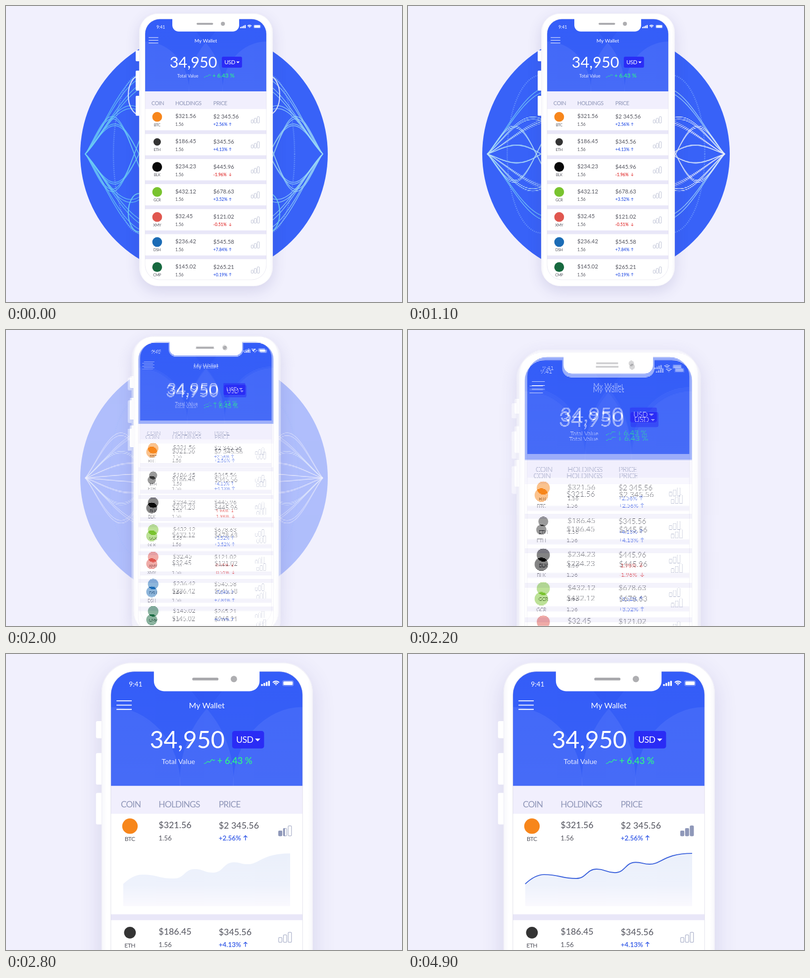
An HTML page with a canvas that plays this animation: 800x600 px, repeating every 5000 ms.

```html
<!DOCTYPE html>
<html lang="en">
<head>
<meta charset="utf-8">
<title>Wallet</title>
<style>
  html, body { margin: 0; width: 100%; height: 100%; overflow: hidden; background: #f1f0fd; }
  canvas { display: block; width: 800px; height: 600px; }
</style>
</head>
<body>
<canvas id="stage" width="800" height="600"></canvas>
<script>
const ctx = document.getElementById('stage').getContext('2d');
const LOOP = 5000, STEP = 100, FIELD = 16;
const BG = '#f1f0fd', INK = '#54555f', LABEL = '#9097b8', UP = '#2e55e6', DOWN = '#e02b2b';

const COINS = [
  ['BTC', '#f7861b', '$321.56', '$2 345.56', '+2.56%'],
  ['ETH', '#343434', '$186.45', '$345.56', '+4.13%'],
  ['BLK', '#080808', '$234.23', '$445.96', '-1.96%'],
  ['GCR', '#79c32f', '$432.12', '$678.63', '+3.52%'],
  ['XMY', '#e0574f', '$32.45', '$121.02', '-0.51%'],
  ['DSH', '#1c6cb6', '$236.42', '$545.58', '+7.84%'],
  ['CMP', '#17693f', '$145.02', '$265.21', '+0.19%']
];

// Piecewise linear value over [time, value] pairs.
function track(t, keys) {
  if (t <= keys[0][0]) return keys[0][1];
  for (let i = 1; i < keys.length; i++) {
    const [t0, a] = keys[i - 1], [t1, b] = keys[i];
    if (t <= t1) return a + (b - a) * (t - t0) / (t1 - t0);
  }
  return keys[keys.length - 1][1];
}

// Smooth curve through evenly spaced values, at rest at both ends.
function glide(t, from, values) {
  const last = values.length - 1;
  const pos = Math.min(last, Math.max(0, (t - from) / STEP));
  const i = Math.min(last - 1, Math.floor(pos)), u = pos - i;
  const slope = k => k > 0 && k < last ? (values[k + 1] - values[k - 1]) / 2 : 0;
  const a = values[i], b = values[i + 1], ease = u * u * (3 - 2 * u);
  return a + (b - a) * ease + slope(i) * u * (1 - u) ** 2 - slope(i + 1) * u * u * (1 - u);
}

function ease(t, from, to) {
  const u = Math.min(1, Math.max(0, (t - from) / (to - from)));
  return u * u * (3 - 2 * u);
}

const ZOOM = [1, 1.03, 1.1, 1.22, 1.36, 1.475, 1.53, 1.568, 1.581];
const DROP = [0, 6, 26, 70, 130, 178, 193, 190, 180, 171, 168];
const FADE = [[1800, 1], [1900, 0.72], [2000, 0.35], [2120, 0]];

// Each strand: angular reach, amplitude and whiteness over time.
const STRANDS = [
  { reach: [[0, 1.35]], amp: [[0, 166], [600, 141], [1600, 130], [2000, 95]], white: [[0, 0], [600, 0.2], [1600, 0], [2000, 1]] },
  { reach: [[1600, 3.5], [2000, 2.5]], amp: [[0, 76], [600, 38], [1600, 76], [2000, 92]], white: [[0, 0], [600, 0.1], [1600, 1]] },
  { reach: [[1600, 3.15], [2000, 2.5]], amp: [[0, 61], [600, 13], [1600, 24], [2000, 55]], white: [[0, 0], [600, 0.1], [1600, 0.9]] },
  { reach: [[0, 1.9]], amp: [[0, 98], [600, 92], [1600, 58], [2000, 30]], white: [[0, 0], [600, 0.1], [1600, 1]] },
  { reach: [[0, 1.2]], amp: [[0, 150], [600, 120], [1600, 25], [2000, 9]], white: [[0, 0], [600, 0.3], [1600, 1]] }
];

function rounded(x, y, w, h, r, fill, stroke) {
  ctx.beginPath();
  ctx.roundRect(x, y, w, h, r);
  if (fill) { ctx.fillStyle = fill; ctx.fill(); }
  if (stroke) { ctx.strokeStyle = stroke; ctx.stroke(); }
}

function disc(x, y, r, fill) {
  ctx.beginPath();
  ctx.arc(x, y, r, 0, Math.PI * 2);
  ctx.fillStyle = fill;
  ctx.fill();
}

function line(points, color, width) {
  ctx.beginPath();
  points.forEach(([x, y], i) => i ? ctx.lineTo(x, y) : ctx.moveTo(x, y));
  ctx.strokeStyle = color;
  ctx.lineWidth = width;
  ctx.stroke();
}

function text(str, x, y, size, color, { weight = 400, spacing = 0, align = 'left' } = {}) {
  ctx.font = `${weight} ${size}px Lato, sans-serif`;
  ctx.letterSpacing = spacing + 'px';
  ctx.textAlign = align;
  ctx.fillStyle = color;
  ctx.fillText(str, x, y);
}

function drawGlobe(t) {
  const alpha = track(t, FADE);
  if (alpha <= 0) return;
  ctx.save();
  ctx.globalAlpha = alpha;
  disc(400, 300, 250, '#3862f8');
  ctx.globalAlpha = Math.sqrt(alpha);

  for (const side of [-1, 1]) {
    for (const flip of [-1, 1]) {
      for (const { reach, amp, white } of STRANDS) {
        const glow = Math.min(1, track(t, white) + (side > 0 && t < 1600 ? 0.35 : 0));
        const color = `rgba(${108 + 130 * glow}, ${204 + 34 * glow}, ${244 + 8 * glow}, 0.8)`;
        const sweep = track(t, reach), height = track(t, amp);
        for (const echo of [1, 0.94]) {
          const points = [];
          for (let u = 0; u <= 1.06; u += 0.03) {
            points.push([400 + side * (240 - 109 * u),
              300 + flip * echo * height * Math.sin(sweep * u ** 1.15)]);
          }
          line(points, color, 1.5);
        }
      }
      const loop = track(t, [[0, 22], [600, 5], [900, 0]]);
      if (loop > 0) {
        ctx.beginPath();
        ctx.ellipse(400 + side * 131, 300 + flip * 119, loop, 39, 0, 0, Math.PI * 2);
        ctx.strokeStyle = flip < 0 ? '#dfe8ff' : '#6cc8f4';
        ctx.lineWidth = 2;
        ctx.stroke();
      }
    }
    ctx.beginPath();
    ctx.ellipse(400 + side * 131, 300, track(t, [[0, 52], [600, 71], [1600, 66], [2000, 60]]), 160, 0, 0, Math.PI * 2);
    ctx.setLineDash([2, 2]);
    ctx.strokeStyle = `rgba(130, 175, 255, ${0.55 * alpha})`;
    ctx.lineWidth = 2.5;
    ctx.stroke();
    ctx.setLineDash([]);
  }
  ctx.restore();
}

function drawBody(scale) {
  ctx.save();
  ctx.shadowColor = 'rgba(70, 60, 140, 0.16)';
  ctx.shadowBlur = 28 * scale;
  ctx.shadowOffsetY = 9 * scale;
  rounded(269, 15, 270, 553, 38, '#fff');
  ctx.restore();

  for (const [y, h] of [[90, 22], [131, 40.5], [182, 40.5]]) rounded(262, y, 10, h, 2, '#fff');
  const shade = ctx.createLinearGradient(269, 0, 539, 0);
  shade.addColorStop(0, '#f7f7fb');
  shade.addColorStop(0.025, '#fff');
  shade.addColorStop(0.975, '#fff');
  shade.addColorStop(1, '#f7f7fb');
  ctx.lineWidth = 0.8;
  rounded(269.4, 15.4, 269.2, 552.2, 38, shade, '#f0eff7');
}

function drawHeader() {
  const blue = ctx.createLinearGradient(0, 27, 0, 173);
  blue.addColorStop(0, '#345df8');
  blue.addColorStop(1, '#3860f6');
  ctx.fillStyle = blue;
  ctx.fillRect(281, 26, 245, 147);

  ctx.save();
  ctx.beginPath();
  ctx.rect(281, 26, 245, 147);
  ctx.clip();
  ctx.fillStyle = 'rgba(255, 255, 255, 0.07)';
  for (const x of [281, 526]) {
    ctx.beginPath();
    ctx.ellipse(x, 173, 89, 101, 0, 0, Math.PI * 2);
    ctx.fill();
  }
  ctx.beginPath();
  ctx.moveTo(403.5, 74);
  ctx.quadraticCurveTo(368, 115, 369, 173);
  ctx.lineTo(438, 173);
  ctx.quadraticCurveTo(439, 115, 403.5, 74);
  ctx.fill();
  ctx.beginPath();
  ctx.moveTo(383, 50);
  ctx.quadraticCurveTo(393, 64, 403.5, 74);
  ctx.quadraticCurveTo(414, 64, 424, 50);
  ctx.fillStyle = 'rgba(20, 50, 210, 0.12)';
  ctx.fill();
  ctx.restore();

  text('9:41', 304, 46, 8.7, '#fff');
  for (let i = 0; i < 4; i++) rounded(473 + i * 3, 42.6 - i * 1.4, 2.2, 2.4 + i * 1.4, 0.5, '#fff');
  for (const r of [1.2, 3.4, 5.6]) {
    ctx.beginPath();
    ctx.arc(492, 44.4, r, -Math.PI * 0.76, -Math.PI * 0.24);
    ctx.strokeStyle = '#fff';
    ctx.lineWidth = 1.4;
    ctx.stroke();
  }
  ctx.lineWidth = 0.5;
  rounded(500.5, 38.2, 13.8, 6.6, 1.6, null, 'rgba(255, 255, 255, 0.6)');
  rounded(501.4, 39.1, 12, 4.8, 1, '#fff');

  for (const y of [64, 69.5, 75]) line([[288.2, y], [307.7, y]], '#fff', 1.2);
  text('My Wallet', 403.6, 73.8, 10.1, '#fff', { align: 'center' });
  text('34,950', 330.8, 124.5, 30.6, '#fff');
  rounded(436, 102.7, 40.8, 22.4, 3, '#2a2cf5');
  text('USD', 441.2, 118, 11.2, '#fff', { spacing: -0.4 });
  ctx.beginPath();
  ctx.moveTo(465.2, 112.5);
  ctx.lineTo(472, 112.5);
  ctx.lineTo(468.6, 116);
  ctx.fill();
  text('Total Value', 346, 145.2, 8.9, '#e8ecff');
  ctx.beginPath();
  ctx.moveTo(400, 144.5);
  ctx.bezierCurveTo(404, 144.5, 403.5, 140.5, 406, 142.3);
  ctx.bezierCurveTo(408.5, 144, 409, 138, 411, 139.6);
  ctx.quadraticCurveTo(412.3, 141.2, 414, 139.6);
  ctx.strokeStyle = '#2df28a';
  ctx.lineWidth = 0.9;
  ctx.stroke();
  text('+ 6.43 %', 417, 145.2, 11.6, '#2df28a', { weight: 600 });
}

function drawBars(top, filled) {
  const bars = (fill, stroke) => {
    ctx.lineWidth = 0.8;
    for (let i = 0; i < 3; i++) {
      const h = 6.2 + i * 3.3;
      rounded(495.4 + i * 6.1, top + 28.4 - h, 4.2, h, 1, fill, stroke);
    }
  };
  bars(null, '#adb3cb');
  if (filled <= 0) return;
  ctx.save();
  ctx.beginPath();
  ctx.rect(494.5, top, 18 * filled, 40);
  ctx.clip();
  bars('#8f98b9', '#8f98b9');
  ctx.restore();
}

function drawRow([name, color, held, price, change], top, height, filled) {
  ctx.fillStyle = '#fff';
  ctx.fillRect(281, top, 245, height);
  disc(305.4, top + 16, name === 'ETH' ? 7.5 : 9.9, color);
  text(name, 305.2, top + 35, 7.7, INK, { spacing: -0.4, align: 'center' });
  text(held, 342, top + 18.7, 11.3, INK);
  text('1.56', 342, top + 34.4, 8.5, INK);
  text(price, 418.8, top + 19.4, 11.3, INK);

  const rising = change[0] === '+', tone = rising ? UP : DOWN;
  text(change, 418.8, top + 34.4, 8.5, tone, { weight: 600 });
  const y = top + 31.2, d = rising ? -1 : 1;
  line([[453, y - 3 * d], [453, y + 3 * d]], tone, 0.9);
  line([[450.7, y + 0.8 * d], [453, y + 3 * d], [455.3, y + 0.8 * d]], tone, 0.9);
  drawBars(top, filled);
}

function traceChart() {
  const points = [[320.9, 286.8], [362, 291.8], [388, 279.8], [411.4, 284.3], [438, 271], [455.7, 273.5]];
  ctx.beginPath();
  ctx.moveTo(296.8, 298.8);
  ctx.bezierCurveTo(304, 292, 312, 286.8, ...points[0]);
  for (let i = 1; i < points.length; i++) {
    const [x0, y0] = points[i - 1], [x1, y1] = points[i], mid = (x0 + x1) / 2;
    ctx.bezierCurveTo(mid, y0, mid, y1, x1, y1);
  }
  ctx.bezierCurveTo(471, 273.5, 474, 259.6, 510.1, 259.6);
}

function drawChart(t) {
  const shown = ease(t, 2550, 2780), drawn = ease(t, 2830, 3520);
  if (shown <= 0) return;
  ctx.save();
  ctx.globalAlpha = shown;
  const wash = ctx.createLinearGradient(0, 260, 0, 327);
  wash.addColorStop(0, '#ebf0fb');
  wash.addColorStop(0.6, '#eef2fc');
  wash.addColorStop(1, '#faf9fe');
  traceChart();
  ctx.lineTo(510.1, 327.2);
  ctx.lineTo(296.8, 327.2);
  ctx.fillStyle = wash;
  ctx.fill();
  if (drawn > 0) {
    ctx.beginPath();
    ctx.rect(296, 250, 215 * drawn, 80);
    ctx.clip();
    traceChart();
    ctx.strokeStyle = '#3c62dc';
    ctx.lineWidth = 1.25;
    ctx.stroke();
  }
  ctx.restore();
}

function drawPhone(t) {
  const scale = glide(t, 1800, ZOOM);
  const opened = 85.8 * ease(t, 2420, 2760);
  ctx.save();
  ctx.translate(403.5 + 2 * (scale - 1) / 0.581, 300 + glide(t, 1800, DROP));
  ctx.scale(scale, scale);
  ctx.translate(-403.5, -300);
  drawBody(scale);

  ctx.save();
  ctx.beginPath();
  ctx.roundRect(281, 26.5, 245, 528.5, 30);
  ctx.clip();
  ctx.fillStyle = '#e9e7f8';
  ctx.fillRect(281, 26, 245, 530);
  ctx.fillStyle = '#f1effd';
  ctx.fillRect(281, 173, 245, 35.5);
  drawHeader();
  text('COIN', 293.7, 200.6, 11, LABEL, { spacing: -0.5 });
  text('HOLDINGS', 342, 200.6, 11, LABEL, { spacing: -0.5 });
  text('PRICE', 418.8, 200.6, 11, LABEL, { spacing: -0.5 });

  COINS.forEach((coin, i) => {
    const first = i === 0;
    drawRow(coin, 208.7 + 50.75 * i + (first ? 0 : opened), 43.2 + (first ? opened : 0),
      first ? track(t, [[2700, 0], [2900, 1]]) : 0);
  });
  ctx.save();
  ctx.beginPath();
  ctx.rect(281, 208.7, 245, 43.2 + opened);
  ctx.clip();
  drawChart(t);
  ctx.restore();
  ctx.restore();

  ctx.lineWidth = 0.6;
  rounded(281, 26.5, 245, 528.5, 30, null, 'rgba(205, 203, 222, 0.6)');
  rounded(336, 23, 135, 28.7, [0, 0, 13, 13], '#fff');
  rounded(385, 34.3, 33.5, 3.6, 1.8, '#a8a8ac');
  disc(438.2, 36.1, 4.1, '#aeaeb1');
  ctx.restore();
}

function drawScene(t) {
  ctx.fillStyle = BG;
  ctx.fillRect(0, 0, 800, 600);
  drawGlobe(t);
  drawPhone(t);
}

// While things move, alternate scan lines show slightly different moments.
function render(t) {
  const moving = t > 0 && t < 2800;
  drawScene(moving ? t + FIELD : t);
  if (!moving) return;
  ctx.save();
  ctx.beginPath();
  for (let y = 0; y < 600; y += 2) ctx.rect(0, y, 800, 1);
  ctx.clip();
  drawScene(t - FIELD);
  ctx.restore();
}

const start = performance.now();
let shownStep = -1;
function tick() {
  const step = Math.floor(((performance.now() - start) % LOOP) / STEP);
  if (step !== shownStep) {
    shownStep = step;
    render(step * STEP);
  }
  requestAnimationFrame(tick);
}
tick();
</script>
</body>
</html>
```
